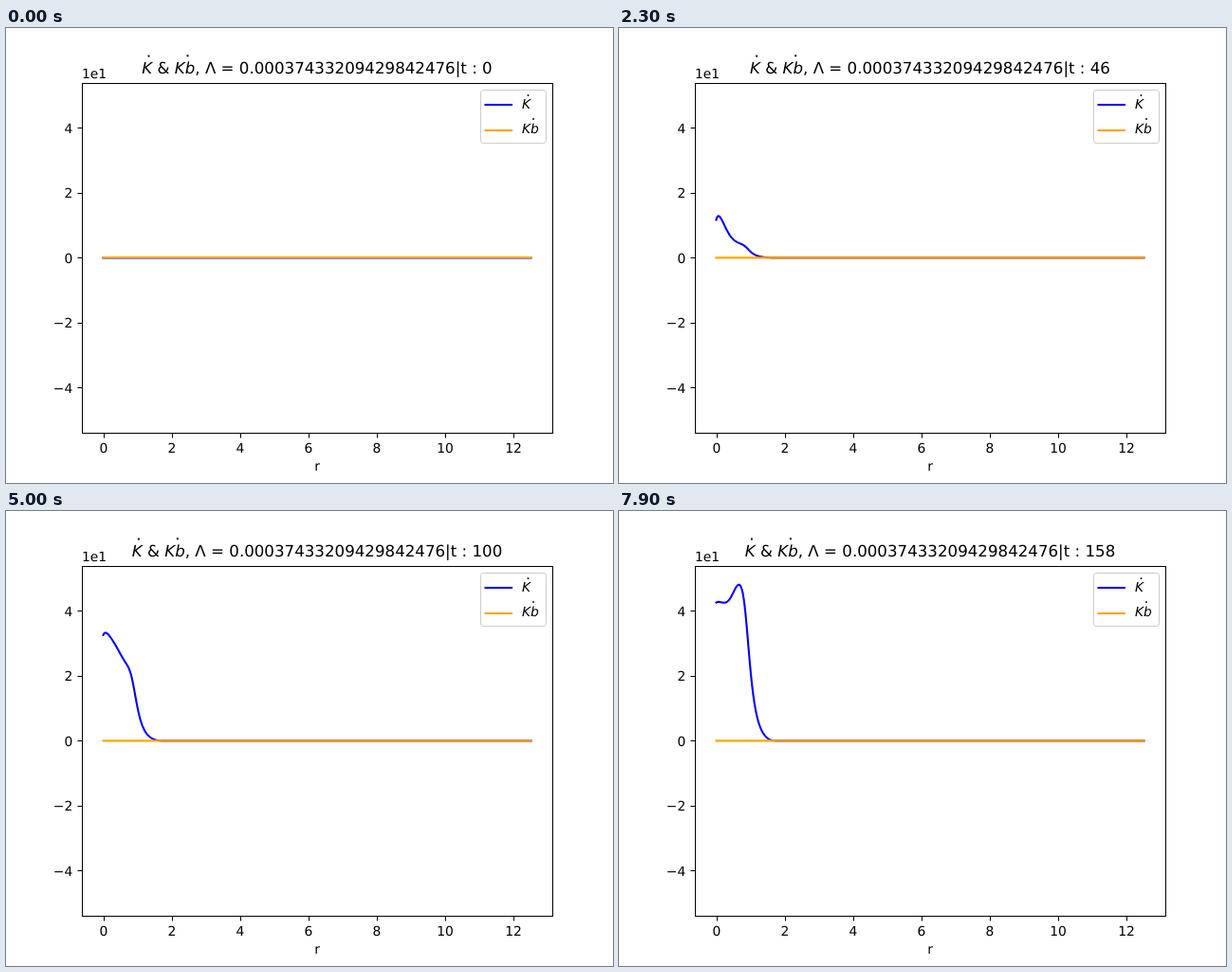
Animation, 640 px wide and 480 px high, one loop 8 s. Source, as an HTML page:

```html
<!DOCTYPE html>
<html lang="en">
<head>
<meta charset="utf-8">
<title>Line plot over time</title>
<style>
  html, body { margin: 0; width: 100%; height: 100%; overflow: hidden; background: #fff; }
  svg { display: block; width: 640px; height: 480px; }
  text { font: 13.889px "DejaVu Sans", sans-serif; text-rendering: geometricPrecision; }
  .title { font-size: 16.667px; }
  .mid { text-anchor: middle; }
  .end { text-anchor: end; }
  .it { font-style: italic; }
  .line { fill: none; stroke-width: 2.083; stroke-linecap: square; stroke-linejoin: round; }
  .blue { stroke: #00f; }
  .orange { stroke: #ffa500; }
  .axis { fill: none; stroke: #000; stroke-width: 1; }
</style>
</head>
<body>
<svg viewBox="0 0 640 480">
  <path id="curve" class="line blue"/>
  <path id="flat" class="line orange"/>
  <rect class="axis" x="80.5" y="58.5" width="496" height="369"/>
  <g id="ticks"></g>
  <text x="80" y="53">1e1</text>
  <text class="mid" x="328" y="467">r</text>

  <text class="title mid" x="328" y="48"><tspan class="it">K</tspan> &amp; <tspan class="it">Kb</tspan>, Λ = 0.00037433209429842476|t : <tspan id="count">0</tspan></text>
  <g id="dots">
    <rect x="6.3" y="28.6" width="1.9" height="2"/>
    <rect x="47.3" y="28.3" width="1.9" height="2"/>
  </g>

  <rect x="500.5" y="65.5" width="69" height="56" rx="2.8" fill="#fff" fill-opacity=".8" stroke="#ccc"/>
  <path class="line blue" d="M505.5 81H533"/>
  <path class="line orange" d="M505.5 108H533"/>
  <text class="it" x="544" y="85">K</text>
  <text class="it" x="544" y="111">Kb</text>
  <rect x="549.7" y="70.2" width="1.6" height="1.7"/>
  <rect x="555.2" y="95.2" width="1.6" height="1.7"/>
</svg>
<script>
const $ = id => document.getElementById(id);
const LEFT = 102.55, RIGHT = 553.45, BASE = 242.4;

let marks = '';
for (let v = 0; v <= 12; v += 2) {
  const x = Math.round(LEFT + v * 36.07);
  marks += `<path class="axis" d="M${x + 0.5} 427.5v5"/><text class="mid" x="${x}" y="448">${v}</text>`;
}
for (let v = -4; v <= 4; v += 2) {
  const y = BASE - v * 34.25;
  marks += `<path class="axis" d="M80.5 ${Math.round(y) + 0.5}h-5"/>` +
    `<text class="end" x="70.3" y="${Math.round(y + 5.2)}">${String(v).replace('-', '−')}</text>`;
}
$('ticks').innerHTML = marks;

// Strength in pixels of the three parts of the curve at a few moments
const times = [0, 30, 64, 84, 100, 134, 158];
const parts = {
  plateau: [0, 7, 29, 53, 81, 143, 172],
  peak: [0, 21, 27.5, 21.7, 15.5, 11, 5],
  dome: [0, 0, 13, 21, 19, -15, -30]
};

// Smooth curve through uneven knots
function spline(ks, vs, k) {
  const last = ks.length - 1;
  const secant = i => (vs[i + 1] - vs[i]) / (ks[i + 1] - ks[i]);
  const slope = i => {
    if (i === 0) return 2 * secant(0) - slope(1);
    if (i === last) return 2 * secant(last - 1) - slope(last - 1);
    const a = ks[i] - ks[i - 1], b = ks[i + 1] - ks[i];
    return (secant(i - 1) * b + secant(i) * a) / (a + b);
  };
  let i = 0;
  while (i < last - 1 && k > ks[i + 1]) i++;
  const w = ks[i + 1] - ks[i], u = (k - ks[i]) / w, r = 1 - u;
  return vs[i] * r * r * (1 + 2 * u) + vs[i + 1] * u * u * (3 - 2 * u) +
    w * u * r * (slope(i) * r - slope(i + 1) * u);
}

// Bell of the given width; higher powers have a flatter top
const bell = (u, width, power) => Math.exp(-((u / width) ** power));

// Steep shoulder followed by a longer tail
const falloff = u => (1 + Math.exp((u - 31.2) / 2.5)) ** -0.4 * bell(u, 57, 14);

function profile(t) {
  const [plateau, peak, dome] = Object.values(parts).map(vs => spline(times, vs, t));
  return u => falloff(u) * (plateau + dome * bell(u, 20, 4) +
    peak * (bell(u, 11, 2) - 0.25 * bell(u, 1.5, 1)));
}

function draw(t) {
  const height = profile(t);
  let d = '';
  for (let u = 0; u <= 64; u += 0.5) {
    d += `${d ? 'L' : 'M'}${LEFT + u} ${(BASE - height(u)).toFixed(2)}`;
  }
  $('curve').setAttribute('d', `${d}L168 ${BASE}H${RIGHT}`);
  // The flat line lies on whole pixels until it starts to vary
  $('flat').setAttribute('d', `M${LEFT} ${t < 46 ? Math.round(BASE) : BASE}H${RIGHT}`);
  $('count').textContent = t;
  const start = 148.55 - 5.3 * String(t).length;
  $('dots').setAttribute('transform', `translate(${start} 0)`);
}

let shown = -1;
function tick() {
  const t = 2 * Math.floor(performance.now() % 8000 / 100);
  if (t !== shown) draw(shown = t);
  requestAnimationFrame(tick);
}
tick();
</script>
</body>
</html>
```
